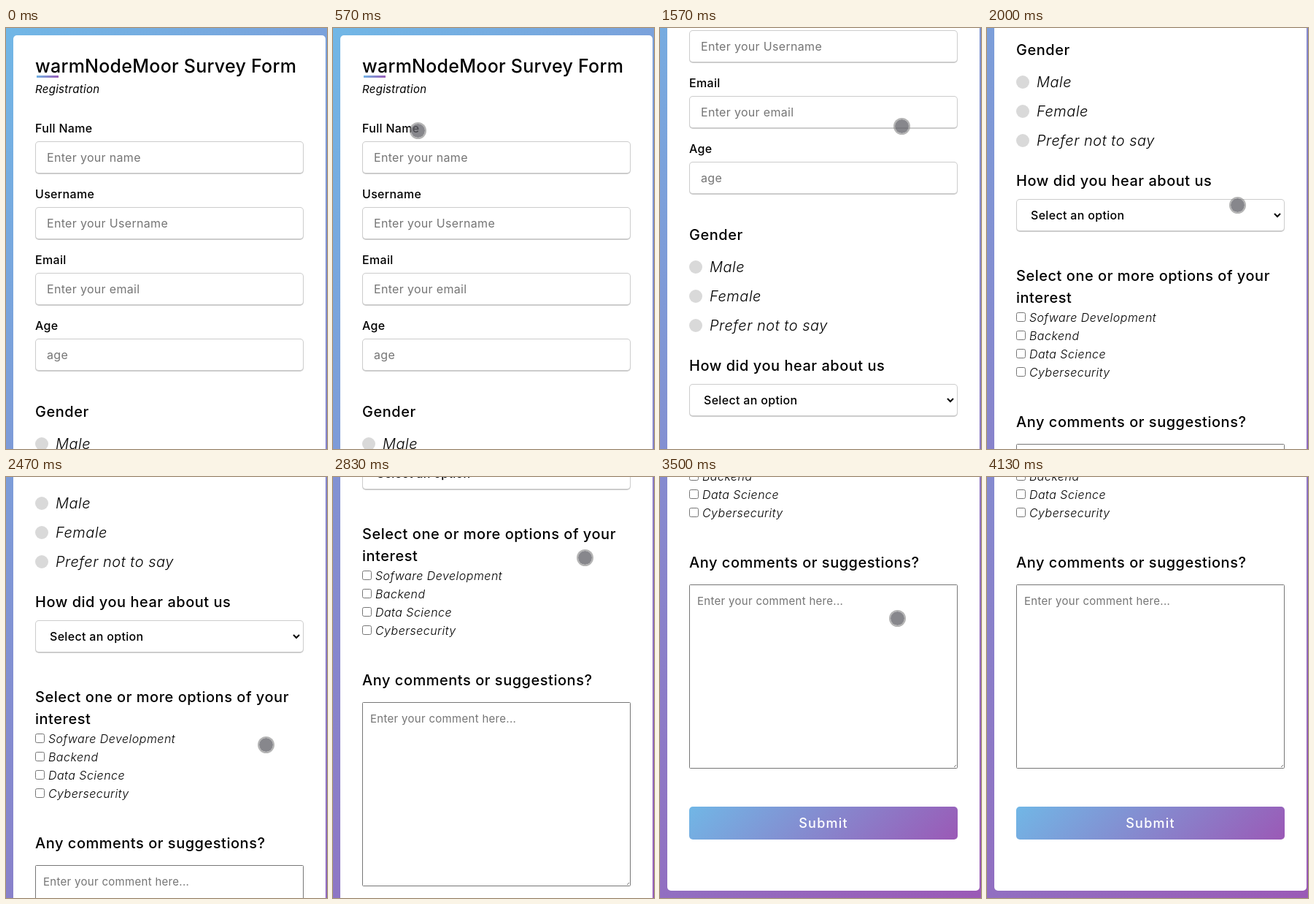
These frames come from a looping animation (440 by 576 pixels, 5.56 s). An HTML page:

```html
<!DOCTYPE html>
<html lang="en">
<head>
<meta charset="utf-8">
<title>Survey Form</title>
<style>
  html, body { margin: 0; width: 100%; height: 100%; overflow: hidden; background: #fff; }
  #stage { position: relative; width: 440px; height: 576px; overflow: hidden; }
  svg { display: block; position: absolute; left: 0; top: 0; }
  text { font: 400 16px Inter, "Open Sans", sans-serif; letter-spacing: .02em; fill: #000; white-space: pre; }
  .title { font-size: 25px; font-weight: 500; letter-spacing: .01em; }
  .sub { font-size: 15px; font-style: italic; }
  .label { font-weight: 500; }
  .head { font-size: 20px; font-weight: 500; letter-spacing: .026em; }
  .hint { fill: #757575; }
  .note { font-size: 15px; }
  .radio { font-size: 20px; font-weight: 300; font-style: italic; letter-spacing: .026em; }
  .check { font-weight: 300; font-style: italic; letter-spacing: .03em; }
  .submit { font-size: 18px; font-weight: 500; letter-spacing: 1.2px; fill: #fff; text-anchor: middle; }
  #touch {
    position: absolute; left: -11.5px; top: -11.5px; width: 23px; height: 23px;
    box-sizing: border-box; border-radius: 50%;
    background: rgba(98, 98, 104, .76) padding-box; border: 2px solid rgba(140, 140, 140, .65);
  }
</style>
</head>
<body>
<div id="stage">
  <svg id="page" width="448" height="1493" viewBox="0 0 448 1493"></svg>
  <div id="touch"></div>
</div>
<script>
const LOOP = 5560;
const FRAME = 100 / 3;
const CARD = '#fff';

const rect = (x, y, w, h, r, fill, extra = '') =>
  `<rect x="${x}" y="${y}" width="${w}" height="${h}" rx="${r}" fill="${fill}" ${extra}/>`;
const text = (kind, x, y, str) => `<text class="${kind}" x="${x}" y="${y}">${str}</text>`;

// Box with a diagonal gradient from corner to corner, like CSS 135deg
const gradientBox = (id, x, y, w, h, r) => {
  const d = (w + h) / 2;
  return `<linearGradient id="${id}" gradientUnits="userSpaceOnUse" x1="${x}" y1="${y}" x2="${x + d}" y2="${y + d}">
    <stop stop-color="#71b7e6"/><stop offset="1" stop-color="#9b59b6"/></linearGradient>` +
    rect(x, y, w, h, r, `url(#${id})`);
};

const box = y => rect(40, y, 368, 45, 5, '#ccc') + rect(41, y + 1, 366, 42, 4, CARD);
const field = ([label, hint], i) => {
  const y = 155 + i * 90;
  return text('label', 40, y - 12, label) + box(y) + text('hint', 56, y + 28, hint);
};
const radio = (label, i) => {
  const y = 569 + i * 40;
  return `<circle cx="49" cy="${y}" r="9" fill="#d9d9d9"/>` + text('radio', 68, y + 7, label);
};
const check = (label, i) => {
  const y = 884 + i * 25;
  return rect(40.5, y + .5, 12, 12, 2, CARD, 'stroke="#767676"') + text('check', 58, y + 13, label);
};

document.getElementById('page').innerHTML = [
  gradientBox('back', 0, 0, 448, 1493, 0),
  rect(10, 10, 428, 1473, 5, CARD),
  text('title', 40, 61, 'warmNodeMoor Survey Form'),
  gradientBox('underline', 42, 65, 30, 3, 0),
  text('sub', 40, 89, 'Registration'),
  ...[['Full Name', 'Enter your name'], ['Username', 'Enter your Username'],
    ['Email', 'Enter your email'], ['Age', 'age']].map(field),
  text('head', 40, 532, 'Gender'),
  ...['Male', 'Female', 'Prefer not to say'].map(radio),
  text('head', 40, 711, 'How did you hear about us'),
  box(729),
  text('label', 60, 757, 'Select an option'),
  '<path d="M394 749l4 4 4-4" fill="none" stroke="#000" stroke-width="2"/>',
  text('head', 40, 841, 'Select one or more options of your'),
  text('head', 40, 871, 'interest'),
  ...['Sofware Development', 'Backend', 'Data Science', 'Cybersecurity'].map(check),
  text('head', 40, 1041, 'Any comments or suggestions?'),
  rect(40.5, 1064.5, 367, 251, 1, CARD, 'stroke="#767676"'),
  '<path d="M403 1314l3-3" stroke="#767676"/>',
  text('hint note', 51, 1092, 'Enter your comment here...'),
  gradientBox('button', 40, 1368, 368, 45, 5),
  text('submit', 224, 1397, 'Submit')
].join('');

const linear = p => p;
const speedUp = p => p * p;
const slowDown = p => 1 - (1 - p) ** 3;
const smooth = p => p * p * (3 - 2 * p);

function poseAt(steps, time) {
  const next = steps.findIndex(([ms]) => ms > time);
  if (next < 0) return steps[steps.length - 1].slice(1, 3);
  const [from, x, y, ease = linear] = steps[next - 1];
  const [to, x2, y2] = steps[next];
  const p = ease((time - from) / (to - from));
  return [x + (x2 - x) * p, y + (y2 - y) * p];
}

// Each step: time in ms, x, y, easing towards the next step.
// The motion is held at 30 pictures a second, each shown from its time rounded to 10 ms.
function play(id, steps) {
  const frames = [];
  for (let k = 0; k * FRAME < LOOP; k++) {
    const [x, y] = poseAt(steps, Math.round(k * FRAME / 10) * 10);
    frames.push({
      offset: Math.max(0, k * FRAME - 5) / LOOP,
      transform: `translate(${Math.round(x)}px, ${Math.round(y)}px)`,
      easing: 'step-end'
    });
  }
  frames.push({ ...frames[frames.length - 1], offset: 1 });
  document.getElementById(id).animate(frames, { duration: LOOP, iterations: Infinity });
}

play('page', [
  [0, 0, 0], [1120, 0, 0, speedUp], [1170, 0, -17], [1570, 0, -242, slowDown],
  [2440, 0, -533], [2630, 0, -533], [2830, 0, -756, slowDown], [3140, 0, -917]
]);

play('touch', [
  [0, 456, 412], [30, 436, 396, smooth], [570, 116, 140], [600, 56, 92],
  [810, 56, 92, smooth], [1090, 322, 362, speedUp], [1170, 323, 328], [1500, 329, 142],
  [1570, 331, 134, smooth], [2470, 356, 366], [2580, 356, 366],
  [2830, 345, 110, smooth], [3500, 325, 193, speedUp], [4130, 456, 260]
]);
</script>
</body>
</html>
```
